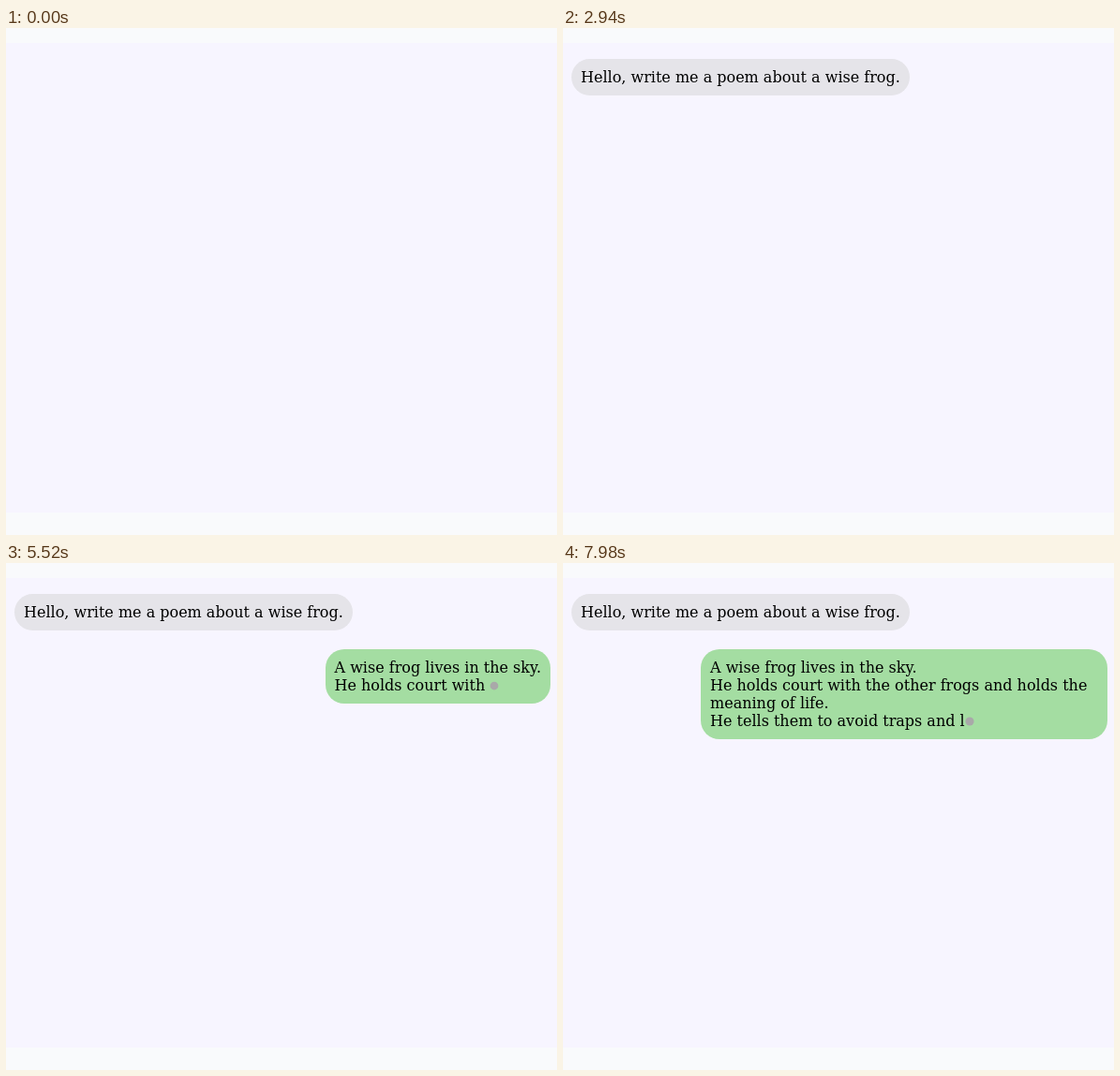
These frames come from a looping animation (588 by 541 pixels, 8 s). An HTML page:

```html
<!DOCTYPE html>
<html lang="en">
<head>
<meta charset="utf-8">
<title>Chat</title>
<style>
  html, body {
    margin: 0;
    width: 100%;
    height: 100%;
    overflow: hidden;
    background: #f9fafc;
  }
  .chat {
    position: absolute;
    left: 0;
    top: 16px;
    width: 588px;
    height: 501px;
    background: #f7f5ff;
  }
  .bubble {
    position: absolute;
    padding: 10px;
    max-width: 414px;
    border-radius: 20px;
    font: 16px/19px "DejaVu Serif", serif;
    color: #000;
    white-space: pre-wrap;
  }
  .ask { left: 9px; top: 17px; background: #e5e4e9; }
  .reply { right: 7px; top: 76px; background: #a4dda2; }
  .dot {
    display: inline-block;
    width: 10px;
    height: 10px;
    margin-right: 5px;
    border-radius: 50%;
    background: #a9a9a9;
  }
</style>
</head>
<body>
<div class="chat">
  <div class="bubble ask"><span class="text"></span><span class="dot"></span></div>
  <div class="bubble reply"><span class="text"></span><span class="dot"></span></div>
</div>
<script>
const LOOP = 8000, STEP = 60, PULSE = 1200;

const messages = [
  { name: "ask", start: 420, rate: 1,
    text: "Hello, write me a poem about a wise frog." },
  { name: "reply", start: 4020, rate: 2,
    text: "A wise frog lives in the sky.\n" +
          "He holds court with the other frogs and holds the meaning of life. \n" +
          "He tells them to avoid traps and l" }
].map(m => {
  const box = document.querySelector("." + m.name);
  return { ...m, box, label: box.querySelector(".text"), dot: box.querySelector(".dot") };
});

function draw(m, time) {
  const step = Math.floor((time - m.start) / STEP);
  m.box.style.display = step < 0 ? "none" : "block";
  if (step < 0) return;

  const typed = m.text.slice(0, step * m.rate);
  if (m.label.textContent !== typed) m.label.textContent = typed;

  // The dot stays one step after the last letter.
  const done = m.name === "ask" && step > m.text.length;
  m.dot.style.display = done ? "none" : "inline-block";

  const phase = step * STEP / PULSE;
  const scale = 0.875 - 0.125 * Math.cos(2 * Math.PI * phase);
  m.dot.style.transform = `scale(${scale.toFixed(3)})`;
}

const origin = performance.now();

function frame() {
  const time = (performance.now() - origin) % LOOP;
  messages.forEach(m => draw(m, time));
  requestAnimationFrame(frame);
}
frame();
</script>
</body>
</html>
```
